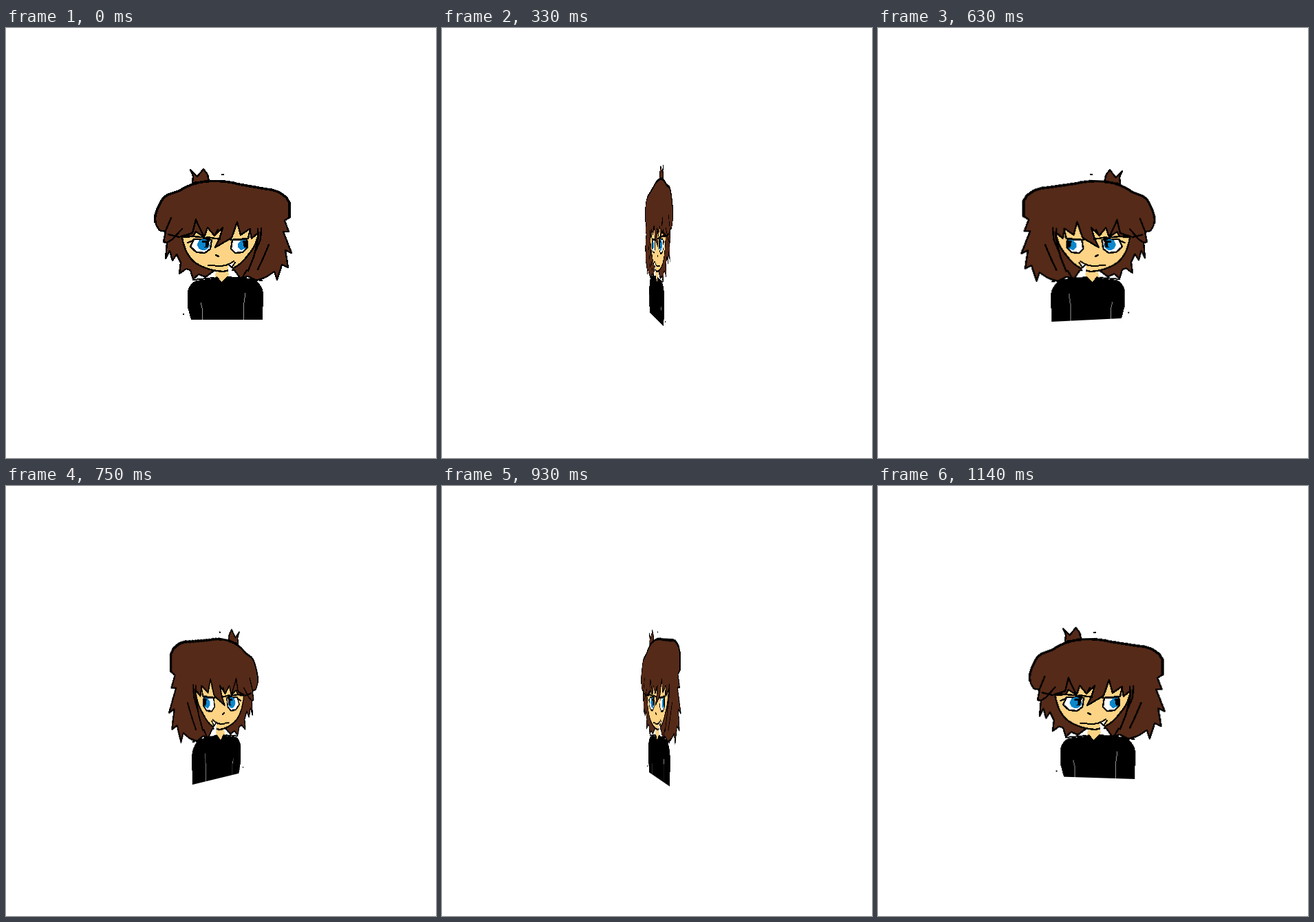
These frames come from a looping animation (625x625 px, 1170 ms). An HTML page:

```html
<!DOCTYPE html>
<html lang="en">
<head>
<meta charset="utf-8">
<title>Turning portrait</title>
<style>
  html, body { margin: 0; width: 100%; height: 100%; overflow: hidden; background: #fff; }
  .stage { width: 625px; height: 625px; overflow: hidden; perspective: 562px; }
  .card { display: block; animation: spin 1170ms steps(39) infinite; }
  @keyframes spin {
    from { transform: rotateY(0deg); }
    to { transform: rotateY(360deg); }
  }
  .ink { stroke: #000; stroke-width: 2.4; stroke-linejoin: round; stroke-linecap: round; }
  .thick { stroke-width: 3.6; }
  .hair { fill: #552a18; }
  .skin { fill: #fdd485; }
  .white { fill: #fff; }
  .iris { fill: #0c86cc; }
  .line { fill: none; }
  .seam { fill: none; stroke: #999; stroke-width: 1; }
</style>
</head>
<body>
<div class="stage">
<svg class="card" width="625" height="625" viewBox="0 0 625 625" shape-rendering="crispEdges">
  <!-- tuft -->
  <path class="hair ink" d="M271 225L272 215L268 206L278 216L287 205L293 213L295 223Z"/>

  <!-- hair -->
  <path class="hair ink" d="M218 286Q215 274 221 261Q227 246 236 242L251 237
    Q270 225 290 223Q318 221 338 227L378 234Q396 235 408 247L412 254L412 275L405 280
    L411 296L403 296L415 327L406 323L410 348L401 344L394 366L390 354L378 362L364 367
    L352 361L340 363L332 352L302 353L290 362L280 358L272 365L268 352L262 350L252 357
    L254 341L248 329L242 338L238 324L232 335L234 312L229 311L232 296L223 294Z"/>
  <path class="line ink thick" d="M217 282Q215 274 221 261Q227 246 236 242L251 237
    Q270 225 290 223Q318 221 338 227L378 234Q396 235 408 247L412 254L412 275"/>

  <!-- neck -->
  <path class="skin" d="M305 351H327L322 362L314 372L304 364Z"/>

  <!-- face, with the fringe as its upper edge -->
  <path class="skin ink" d="M256 304L272 303L276 296L288 304L293 290L303 302L315 290
    L311 304L304 319L328 305L336 282L341 301L354 292L357 306L367 297
    Q365 316 351 331Q337 350 316 354Q294 353 276 342Q260 330 256 304Z"/>

  <!-- strands -->
  <path class="line ink" d="M240 276L231 297M256 292L242 307L234 312M276 278L271 298L254 303
    M276 279L288 304M303 302L308 293M355 292L352 306M366 292L367 304L360 333L352 353
    M371 291L370 307L362 326M382 315L374 334L366 351M252 304L236 300M350 352L345 360"/>

  <!-- left eye -->
  <path class="white ink" d="M273 307L268 318L277 326L289 327L297 321L299 308Z"/>
  <ellipse class="iris" cx="287" cy="315" rx="9" ry="8"/>
  <path d="M285 309H296L294 319H288L285 316Z"/>
  <path class="iris" d="M284 312H290V318H284Z"/>
  <path class="line ink" d="M257 302L285 304L298 308M292 304L311 307M272 309L264 312"/>

  <!-- right eye -->
  <path class="white ink" d="M329 308L327 321L333 327L344 326L350 320V308Z"/>
  <path class="iris" d="M342 308L337 313V319L342 323L349 320V308Z"/>
  <path d="M344 309H352V320L346 319Z"/>
  <path class="line ink" d="M326 308L352 306"/>

  <!-- nose, mouth and fang -->
  <path class="line ink" d="M305 330L309 332"/>
  <path class="line ink" style="stroke-width:2" d="M294 345L313 346L323 344L331 339"/>
  <path class="white" d="M323 344L332 341L326 358L323 356Z"/>
  <path class="line ink" style="stroke-width:2" d="M323 343L328 348L333 341"/>

  <!-- jumper -->
  <path d="M277 367L302 364L307 361L313 369L322 361L345 363L363 367Q373 374 374 386
    L373 424H269L264 406V383Q267 370 277 367Z"/>
  <path class="line ink" style="stroke-width:2" d="M272 366L302 363M346 364L372 367"/>
  <path class="seam" d="M285 424V407L283 399M345 424V406L348 385"/>

  <!-- stray specks -->
  <path d="M313 212H317V214H313ZM257 415H259V417H257Z"/>
</svg>
</div>
</body>
</html>
```
